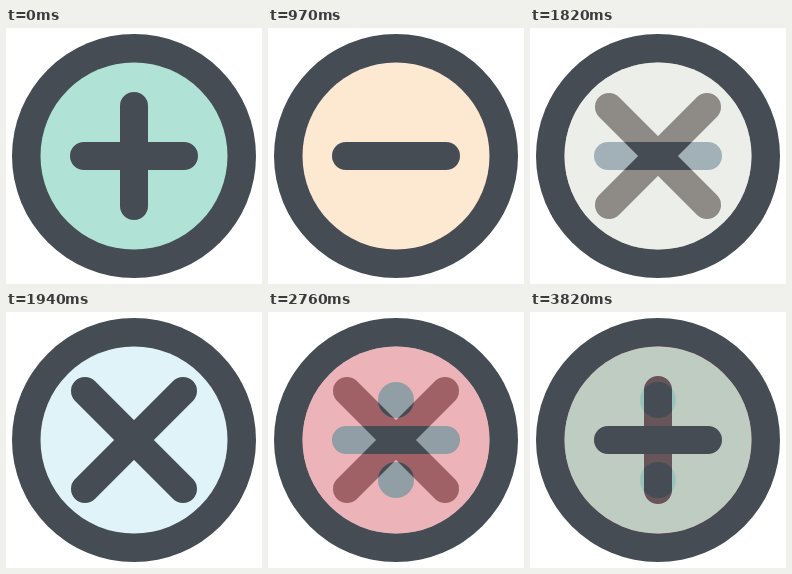
An HTML page for the animation above (3850 ms loop, 256 by 256 pixels).

```html
<!DOCTYPE html>
<html lang="en">
<head>
<meta charset="utf-8">
<title>Math operators</title>
<style>
  html, body { margin: 0; width: 100%; height: 100%; overflow: hidden; background: #fff; }
  svg { display: block; width: 100%; height: 100%; }
  .bars { fill: none; stroke: #454c54; stroke-width: 28; stroke-linecap: round; }
  .dots { fill: #454c54; }
</style>
</head>
<body>
<svg viewBox="0 0 256 256">
  <circle cx="128" cy="128" r="122" fill="#454c54"/>
  <g class="sign">
    <circle cx="128" cy="128" r="93.5" fill="#b0e2d5"/>
    <path class="bars" d="M78 128H178M128 78V178"/>
  </g>
  <g class="sign">
    <circle cx="128" cy="128" r="93.5" fill="#fde8d2"/>
    <path class="bars" d="M78 128H178"/>
  </g>
  <g class="sign">
    <circle cx="128" cy="128" r="93.5" fill="#e0f3f9"/>
    <path class="bars" d="M79 79L177 177M177 79L79 177"/>
  </g>
  <g class="sign">
    <circle cx="128" cy="128" r="93.5" fill="#f87779"/>
    <path class="bars" d="M78 128H178"/>
    <g class="dots">
      <circle cx="128" cy="88" r="18"/>
      <circle cx="128" cy="168" r="18"/>
    </g>
  </g>
</svg>
<script>
  const LOOP = 3850, HOLD = 700, STEP = 30, STEPS = 10;
  const PERIOD = HOLD + STEP * (STEPS - 1);
  const svg = document.querySelector('svg');
  const signs = [...document.querySelectorAll('.sign')];
  let shown = '';

  // Each sign holds, then the next one dissolves in over it in tenths.
  function draw(ms) {
    const t = ms % LOOP;
    const i = Math.floor(t / PERIOD);
    const local = t - i * PERIOD;
    const mix = local < HOLD ? 0 : (Math.floor((local - HOLD) / STEP) + 1) / STEPS;
    const key = i + ':' + mix;
    if (key === shown) return;
    shown = key;
    const from = signs[i], to = signs[(i + 1) % signs.length];
    for (const s of signs) s.setAttribute('opacity', 0);
    from.setAttribute('opacity', 1);
    to.setAttribute('opacity', mix);
    svg.append(from, to);
  }

  const start = performance.now();
  function tick() {
    draw(performance.now() - start);
    requestAnimationFrame(tick);
  }
  tick();
</script>
</body>
</html>
```
